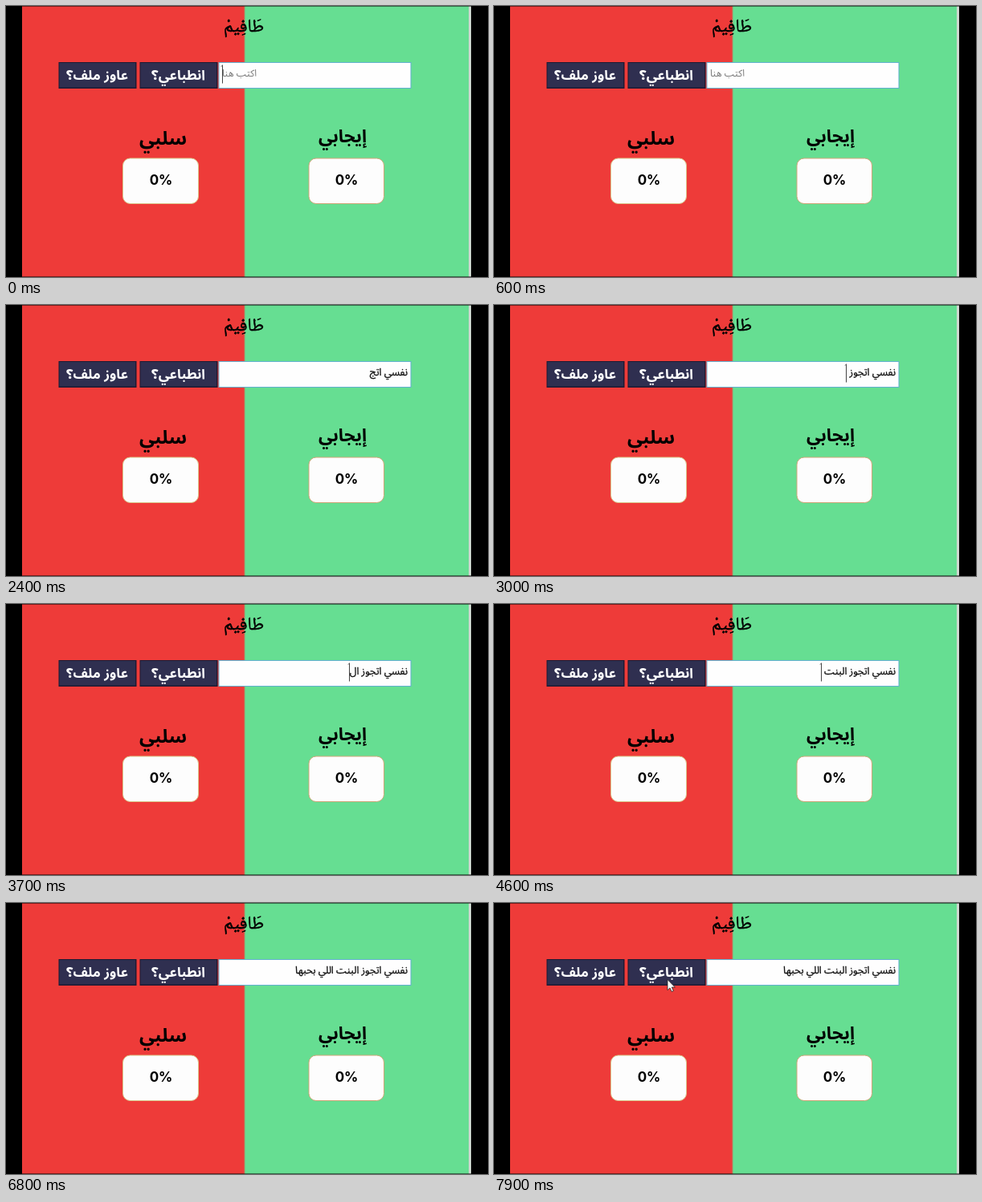
An HTML page for the animation above (8000 ms loop, 600 px wide and 338 px high).

```html
<!DOCTYPE html>
<html lang="ar">
<head>
<meta charset="utf-8">
<style>
  html, body { margin: 0; width: 100%; height: 100%; overflow: hidden; background: #000; }
  svg { display: block; width: 600px; height: 338px; }
  text { white-space: pre; }
  .ar { direction: rtl; text-anchor: start; font-family: "Noto Sans Arabic", "Noto Sans", "DejaVu Sans", sans-serif; }
  .bold { font-weight: 700; }
  .title { font-family: "Noto Naskh Arabic", "Noto Serif", "DejaVu Sans", serif; stroke: #000; stroke-width: .6; }
  #typed { fill: #111; stroke: #111; stroke-width: .3; }
  .score { font: 700 17px Inter, "Open Sans", sans-serif; text-anchor: middle; }
</style>
</head>
<body>
<svg viewBox="0 0 600 338">
  <defs>
    <linearGradient id="split" gradientUnits="userSpaceOnUse" x1="296" x2="298">
      <stop stop-color="#ee3b39"/>
      <stop offset="1" stop-color="#66de92"/>
    </linearGradient>
  </defs>
  <rect width="600" height="338" fill="#000"/>
  <rect x="20" y=".5" width="556" height="337" fill="url(#split)"/>
  <rect x="576" y=".5" width="3" height="337" fill="#cfd8d1"/>

  <text class="ar title" x="321" y="32" data-width="50">طَافِيمْ</text>

  <g id="buttons">
    <rect x="65.5" y="70" width="97" height="33" fill="#1d1a33"/>
    <rect x="66.5" y="71" width="94.5" height="30.5" fill="#2f2f50"/>
    <rect x="166.5" y="70" width="97" height="33" fill="#1d1a33"/>
    <rect x="167.5" y="71" width="94.5" height="30.5" fill="#2f2f50"/>
  </g>
  <text class="ar bold" x="152" y="92" fill="#fff" data-width="77">عاوز ملف؟</text>
  <text class="ar bold" x="248" y="92" fill="#fff" data-width="67">انطباعي؟</text>

  <rect x="265" y="70.5" width="239" height="32" fill="#fefefe" stroke="#62b0d0"/>
  <text id="hint" class="ar" x="312" y="88" fill="#777" data-width="43">اكتب هنا</text>
  <text id="typed" class="ar" x="500" y="88"></text>
  <path id="caret" d="M0 73.5V96.5M0 74L-1.5 75.5" fill="none" stroke="#444"/>

  <text class="ar bold" x="225" y="173" data-width="59">سلبي</text>
  <text class="ar bold" x="449" y="170" data-width="60">إيجابي</text>

  <rect x="145.5" y="190" width="94" height="56.5" rx="9" fill="#fdfdfd" stroke="#d9c58a"/>
  <rect x="377" y="190" width="93.5" height="56.5" rx="9" fill="#fdfdfd" stroke="#cfa678"/>
  <text class="score" x="193" y="223">0%</text>
  <text class="score" x="424" y="223">0%</text>

  <path id="pointer" d="M0 0V13.2L3 10.4L5.2 15L7.4 14L5.3 9.6H9.4Z" fill="#fff" stroke="#222" stroke-width=".8"/>
</svg>
<script>
const LOOP = 8000, BLINK = 500;
const PHRASE = "نفسي اتجوز البنت اللي بحبها";
const PHRASE_WIDTH = 140, RIGHT = 500, HINT_LEFT = 269.5;

// Moment of each key press, ms
const KEYS = [
  700, 850, 1000, 1200, 1450,
  1550, 1700, 1850, 2600, 2800, 3000,
  3250, 3500, 3900, 4100, 4300, 4500,
  4650, 4800, 5000, 5200, 5350,
  5500, 5800, 5950, 6100, 6250
];

// Pointer path: time, x, y
const PATH = [[7400, 268, 128], [7600, 236, 106], [7800, 216, 95.5]];

const $ = id => document.getElementById(id);
const hint = $("hint"), typed = $("typed"), caret = $("caret"), pointer = $("pointer");
const pen = document.createElement("canvas").getContext("2d");

function measure(el, str, size) {
  const style = getComputedStyle(el);
  pen.font = `${style.fontWeight} ${size}px ${style.fontFamily}`;
  return pen.measureText(str).width;
}

// Font size at which a string has the given natural width
const sizeFor = (el, str, width) => 100 * width / measure(el, str, 100);

for (const el of document.querySelectorAll("[data-width]")) {
  el.style.fontSize = sizeFor(el, el.textContent, +el.dataset.width) + "px";
}
const typeSize = sizeFor(typed, PHRASE, PHRASE_WIDTH);
typed.style.fontSize = typeSize + "px";

function drawInput(t) {
  const count = KEYS.filter(k => k <= t).length;
  const str = PHRASE.slice(0, count);
  const idle = t - (count ? KEYS[count - 1] : 0);
  const x = count ? Math.round(RIGHT - measure(typed, str, typeSize)) - .5 : HINT_LEFT;
  if (typed.textContent !== str) typed.textContent = str;
  hint.style.visibility = count ? "hidden" : "visible";
  caret.style.visibility = Math.floor(idle / BLINK) % 2 ? "hidden" : "visible";
  caret.setAttribute("transform", `translate(${x} 0)`);
}

function drawPointer(t) {
  pointer.style.visibility = t < PATH[0][0] ? "hidden" : "visible";
  let [, x, y] = PATH[PATH.length - 1];
  for (let i = 1; i < PATH.length; i++) {
    const [t0, x0, y0] = PATH[i - 1], [t1, x1, y1] = PATH[i];
    if (t >= t1) continue;
    const p = Math.max(0, (t - t0) / (t1 - t0));
    x = x0 + (x1 - x0) * p;
    y = y0 + (y1 - y0) * p;
    break;
  }
  pointer.setAttribute("transform", `translate(${x} ${y})`);
}

const start = performance.now();
function frame() {
  const t = (performance.now() - start) % LOOP;
  drawInput(t);
  drawPointer(t);
  requestAnimationFrame(frame);
}
frame();
</script>
</body>
</html>
```
